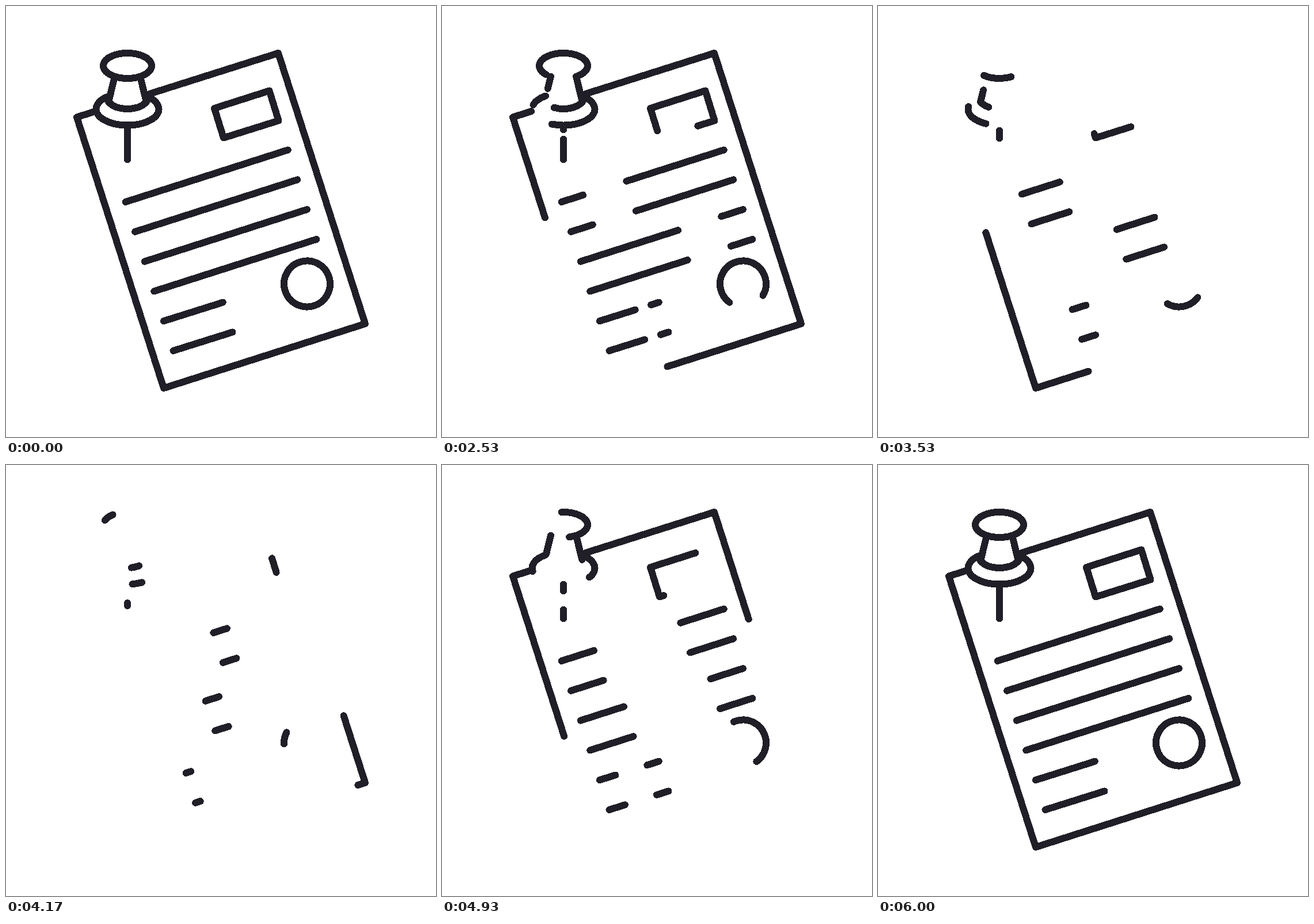
These frames come from a looping animation (747x750 px, 8010 ms). An HTML page:

```html
<!DOCTYPE html>
<html lang="en">
<head>
<meta charset="utf-8">
<title>Pinned note</title>
<style>
  html, body { margin: 0; width: 100%; height: 100%; overflow: hidden; background: #fff; }
  svg { display: block; width: 100%; height: 100%; }
</style>
</head>
<body>
<svg viewBox="0 0 747 750" shape-rendering="crispEdges">
  <g id="note" fill="none" stroke="#201f28" stroke-width="12" stroke-linecap="round" stroke-linejoin="round"></g>
</svg>
<script>
const LOOP = 8010, START = 2000, HALF = 60;
const note = document.getElementById('note');

function addPath(d) {
  const path = document.createElementNS('http://www.w3.org/2000/svg', 'path');
  path.setAttribute('d', d);
  path.setAttribute('pathLength', 100);
  note.appendChild(path);
}

// Sheet, its box and its seal
addPath('M155 183.3 L123 193.5 L274 665 L624 553 L473 82 L245 154.3');
addPath('M362 178 L378 229.5 L473.5 199.5 L457.5 147.5 Z');
addPath('M0 0'.replace('0 0', '561.1 471.3') + ' A40 40 0 0 1 484.9 495.7 A40 40 0 0 1 561.1 471.3 Z');

// Text lines: the first two run left to right, the others right to left
for (let i = 0; i < 6; i++) {
  const x = 207.5 + 16.6 * i, y = 341 + 51.8 * i;
  const [dx, dy] = i < 4 ? [282.2, -90.5] : [103, -32.5];
  const left = `${x} ${y}`, right = `${x + dx} ${y + dy}`;
  addPath(i < 2 ? `M${left} L${right}` : `M${right} L${left}`);
}

// Pin: head, body, base, needle
addPath('M253 104 A42 22 0 0 1 169 104 A42 22 0 0 1 253 104 Z');
addPath('M189 122.5 L178 167 c15 16 51 16 66 0 L233 122.5');
addPath('M180 156.5 A54.5 28 0 1 0 242 156.5');
addPath('M211 207.5 V267.5');

// Erase from the start, then draw again, while the whole trim slides once round
function draw(ms) {
  const t = ms % LOOP - START;
  const step = Math.floor((Math.floor(t / 10) + 0.5) * 0.3); // 30 steps a second, on a 10 ms grid
  const n = Math.min(Math.max(step, 0), 2 * HALF);
  const size = Math.abs(n - HALF) / HALF * 100;
  const from = (n / (2 * HALF) + Math.min(n / HALF, 1)) * 100 % 100;
  note.style.display = size ? '' : 'none';
  if (size === 100) {
    note.removeAttribute('stroke-dasharray');
    return;
  }
  note.setAttribute('stroke-dasharray', `${size} ${100 - size}`);
  note.setAttribute('stroke-dashoffset', 100 - from);
}

const begin = performance.now();
function tick() {
  draw(performance.now() - begin);
  requestAnimationFrame(tick);
}
draw(0);
requestAnimationFrame(tick);
</script>
</body>
</html>
```
